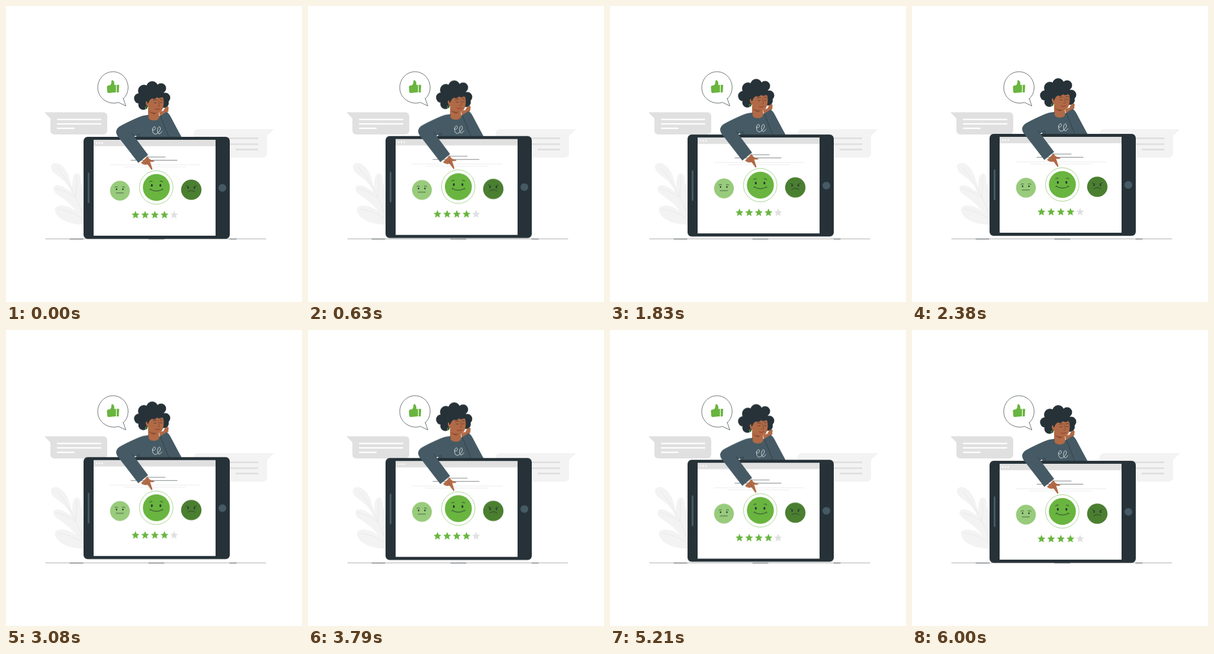
An HTML page that plays this animation: 500x500 px, repeating every 6.04 s.

```html
<!DOCTYPE html>
<html lang="en">
<head>
<meta charset="utf-8">
<title>Customer feedback</title>
<style>
  html, body { margin: 0; width: 100%; height: 100%; overflow: hidden; background: #fff; }
  svg { display: block; width: 100vw; height: 100vh; }
  .float { animation: float 6040ms linear infinite; }
  @keyframes float { 50% { transform: translateY(-6.4px); } }
  .line { fill: none; stroke-linecap: round; stroke-linejoin: round; }
  .ink { stroke: #263238; }
  .dark { fill: #263238; }
  .wool { fill: #455a64; }
  .skin { fill: #b16a46; }
  .green { fill: #69b53f; }
</style>
</head>
<body>
<svg viewBox="0 0 500 500">
  <defs>
    <path id="star" d="M0-6.7 1.9-2.2 6.6-1.9 3 1.3 4.1 6 0 3.5-4.1 6-3 1.3-6.6-1.9-1.9-2.2Z"/>
  </defs>

  <!-- plant -->
  <g>
    <path fill="#f3f3f3" d="M131 369C111 370 88 362 83 347C80 338 91 335 101 338C109 340 114 344 118 346C111 336 98 326 86 318C79 313 78 304 85 303C94 302 103 309 110 314C106 302 96 293 86 286C77 280 73 271 78 267C86 262 96 269 102 279C107 287 109 299 112 307C112 298 112 286 118 283C124 281 127 288 126 298L131 312Z"/>
    <path class="line" stroke="#e4e4e4" stroke-width=".7" d="M86 273Q112 301 131 354M84 308Q103 313 117 323M119 288Q120 306 118 323M88 343Q111 346 131 360"/>
  </g>

  <!-- ground -->
  <path class="line" stroke="#777" stroke-width=".6" d="M67 393.4H439"/>
  <path class="line ink" stroke-width=".7" d="M108 393.7h22M241 393.7h26M378 393.7h11"/>

  <!-- chat bubbles -->
  <path fill="#e0e0e0" d="M65 179.5H164Q171 179.5 171 186.5V210Q171 217 164 217H82Q75 217 75 210V190Z"/>
  <path class="line" stroke="#fff" stroke-width="2.3" d="M87 191.6h73M87 199.1h73M87 206.6h28"/>
  <path fill="#f3f3f3" d="M453 208H325Q317 208 317 216V248Q317 256 325 256H433Q441 256 441 248V219Z"/>
  <path class="line" stroke="#e0e0e0" stroke-width="2.8" style="stroke-linecap:butt" d="M360 223.5h66M360 233.4h66M388 242.5h38"/>

  <!-- thumbs up -->
  <path class="line ink" stroke-width=".7" d="M198.2 156.5L202.4 168.8L189.8 162.8C175 168 155 157 155 138C155 123 166.500 111 180.700 111C195 111 206.300 123 206.300 138Q206 149.500 198.200 156.500Z"/>
  <g class="green">
    <path d="M170.500 136.500Q170.500 134.500 172.500 134.500L176 133.700Q178.400 131 178.200 126.500Q178.500 124.600 180.400 125.400Q183.700 127.500 182.800 133.300H185.800V145.800L173.500 147Q171.200 147 171 144.500Z"/>
    <path d="M187 133.300h4.200l-.7 12.700h-3.500Z"/>
  </g>

  <g class="float">
    <!-- head and torso -->
    <g class="dark">
      <circle cx="247" cy="137" r="10"/>
      <circle cx="262" cy="139" r="8.500"/>
      <circle cx="233" cy="143" r="10"/>
      <circle cx="225" cy="156" r="8.700"/>
      <circle cx="232" cy="167" r="8.500"/>
      <circle cx="269" cy="155" r="8.500"/>
      <circle cx="267" cy="164" r="8"/>
      <circle cx="249" cy="153" r="19"/>
    </g>
    <path class="wool" d="M241 184Q250 189 259 186L270 178Q275 181 278 187L299 226H220V192Z"/>
    <path class="skin" d="M240 171V187Q241 193 250 193.500Q258 193 259 187L258 178Z"/>
    <path fill="#8b4d33" d="M241 177Q247 181 256 180L250 183Q244 181 241 177Z"/>
    <path class="skin" d="M241 156Q249 149 265 153Q268 163 265 173Q262 181 255 180.500Q245 180 241 171Q236 168 236 163Q237 159 241 162Z"/>
    <path class="dark" d="M239 165Q236 151 246 146Q259 143 270 152Q268 157 263 154Q259 157 255 154Q251 159 247 156Q242 158 241 163Z"/>
    <path class="line ink" stroke-width=".7" d="M249 159.500q3-2 5.500-.5M260 158.500q2.500-1.500 4.500 0M250 163.500q2 1 4 0M260.500 163q2 1 3.500 0"/>
    <path class="line" stroke="#7b4029" stroke-width=".7" d="M257.500 160L259.500 168.500Q258 170 256 169.500"/>
    <path class="line" stroke="#8d2c24" stroke-width=".9" d="M252 174q4 2 8-.5"/>
    <circle cx="237" cy="172" r="1.800" fill="none" stroke="#69b53f" stroke-width=".9"/>
    <path class="skin" d="M259 180Q262 177 266 177Q268 171 273 169.500Q276 171 274 175Q276 178 270 181L262 187Q259 185 259 180Z"/>
    <path class="wool" d="M260 186L271 179Q275 181 278 187L298 226H274Z"/>
    <path class="line ink" stroke-width=".6" d="M261 186.500L275 221M225 197V221"/>
    <path class="line" stroke="#fff" stroke-width=".8" d="M247 208C249 212 254 208 252 204.500C249 202 246 209 248.500 214C251 219 257 216 260.500 209C262 204 258 202 256.500 207C255 213 257 217 260 215.500Q262 214 263.500 212"/>

    <!-- tablet -->
    <rect class="dark" x="131" y="221" width="247" height="172.300" rx="7"/>
    <rect x="148" y="226" width="206" height="162" fill="#fff"/>
    <rect x="148" y="226" width="206" height="10.800" fill="#e0e0e0"/>
    <g fill="#fff">
      <circle cx="153" cy="231.400" r="1.300"/>
      <circle cx="157.800" cy="231.400" r="1.300"/>
      <circle cx="162.600" cy="231.400" r="1.300"/>
    </g>
    <rect class="wool" x="138" y="281" width="3" height="52" rx="1.500"/>
    <circle class="wool" cx="365.500" cy="307.200" r="6.500"/>
    <path class="line ink" stroke-width=".6" d="M237 255.100h32M211 260.500h78"/>
    <path class="line" stroke="#ddd" stroke-width=".6" d="M176 268.200h152M199 271.900h104"/>

    <!-- neutral -->
    <circle cx="192.500" cy="312" r="16.700" fill="#98cb7b"/>
    <path class="line ink" stroke-width=".7" d="M186 315.800h12.500M184 306.200q2-1.500 4.500-.5M196.300 305.700q2.500-1 4.500 .5"/>
    <g class="dark">
      <ellipse cx="186.800" cy="309.500" rx="1.200" ry="1.600"/>
      <ellipse cx="197.500" cy="309.500" rx="1.200" ry="1.600"/>
    </g>

    <!-- happy -->
    <circle cx="253.800" cy="306.500" r="28.300" fill="#fff" stroke="#69b53f" stroke-width=".6"/>
    <circle class="green" cx="254" cy="306.500" r="22.800"/>
    <path class="line ink" stroke-width=".9" d="M244 309.800Q254 315.500 264.300 309.800M242.800 310.300l1.800-1.300M263.600 309l1.700 1.300M242.500 297q2-2 4.500-1M260.500 296q2.500-1 4.500 1"/>
    <g class="dark">
      <ellipse cx="246.300" cy="303" rx="1.600" ry="2.200"/>
      <ellipse cx="260.800" cy="303" rx="1.600" ry="2.200"/>
    </g>

    <!-- unhappy -->
    <circle cx="313" cy="310.400" r="17.200" fill="#4b7f30"/>
    <path class="line ink" stroke-width=".8" d="M307 313.800Q313 309.600 319.300 313.800M304.500 303.700l4.300 1.500M317.200 305.200l4.300-1.500"/>
    <g class="dark">
      <ellipse cx="307.500" cy="307.300" rx="1.200" ry="1.700"/>
      <ellipse cx="318.300" cy="307.300" rx="1.200" ry="1.700"/>
    </g>

    <!-- rating -->
    <g class="green">
      <use href="#star" x="218.700" y="352.800"/>
      <use href="#star" x="235" y="352.800"/>
      <use href="#star" x="251.400" y="352.800"/>
      <use href="#star" x="267.700" y="352.800"/>
      <use href="#star" x="284" y="352.800" fill="#e0e0e0"/>
    </g>

    <!-- pointing arm -->
    <path class="skin" d="M228 265L239 254Q241 258 245 260L251 262Q250.500 264 243.500 263L247.400 275.500Q246.600 277.700 245 275.700L239 267.500Q233 270 228 265Z"/>
    <path class="line" stroke="#8b4d33" stroke-width=".5" d="M238 262.500l2 5.500"/>
    <path class="wool" d="M241 184Q231 184 219 190Q201 198 191 204Q183 210 188 219L223.500 265L240 251.500L216.500 220L227 215L241 206Z"/>
    <path class="line ink" stroke-width=".6" d="M224 216.500L216.500 220L212 214.500"/>
  </g>
</svg>
</body>
</html>
```
